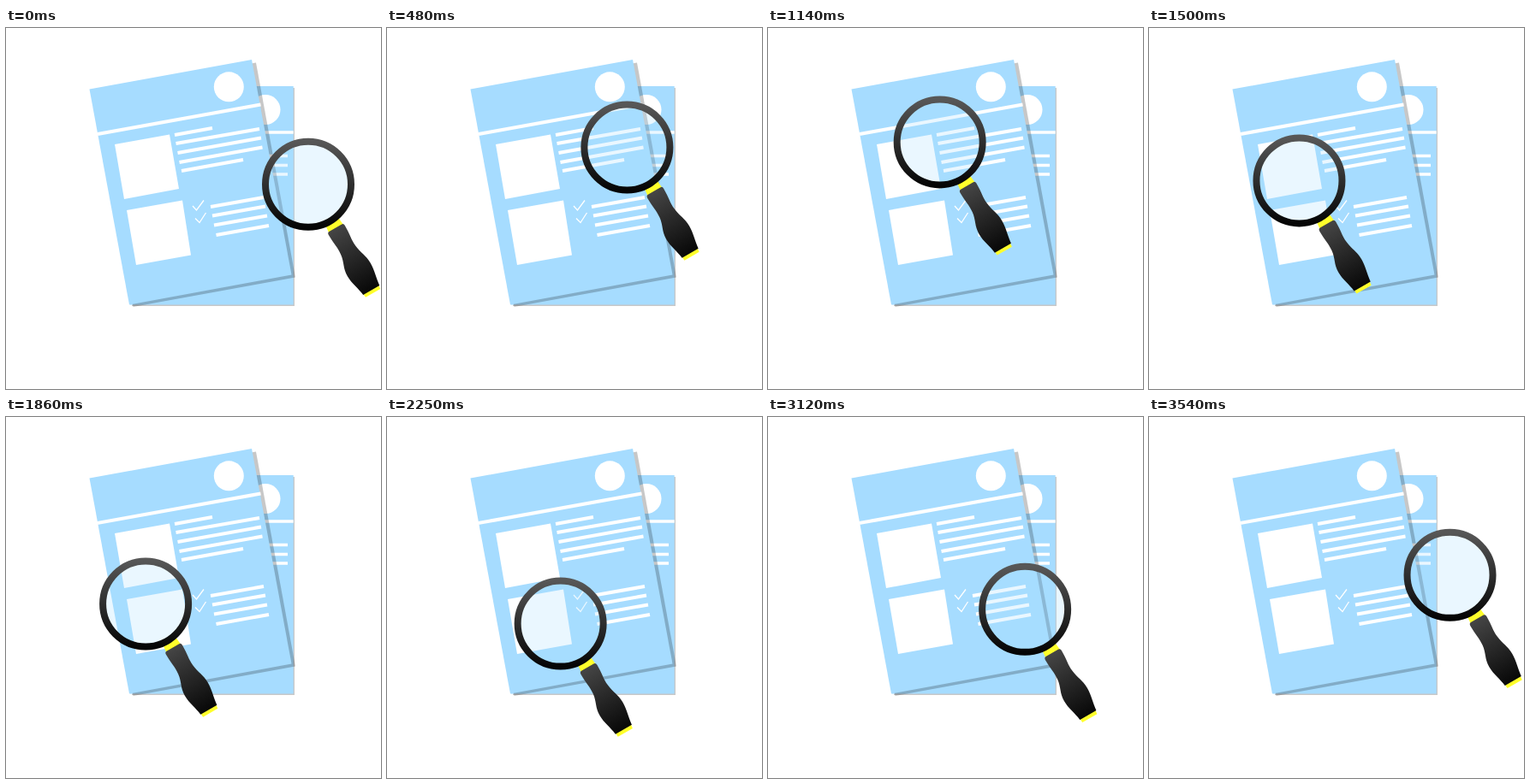
These frames come from a looping animation (438x422 px, 3.57 s). An HTML page:

```html
<!DOCTYPE html>
<html lang="en">
<head>
<meta charset="utf-8">
<title>Document search</title>
<style>
  html, body { margin: 0; width: 100%; height: 100%; overflow: hidden; background: #fff; }
  svg { display: block; width: 438px; height: 422px; }
</style>
</head>
<body>
<svg viewBox="0 0 438 422">
  <defs>
    <linearGradient id="ringShade" x2="0" y2="1">
      <stop stop-color="#575757"/><stop offset="1" stop-color="#050505"/>
    </linearGradient>
    <linearGradient id="gripShade" x2="0" y2="1">
      <stop stop-color="#454545"/><stop offset="1" stop-color="#080808"/>
    </linearGradient>
  </defs>

  <g id="backPage">
    <path d="M147 70H337V325H147Z" fill="#c8c8c8"/>
    <path d="M145 68H335.7V323.6H145Z" fill="#a6dcff"/>
    <circle cx="303" cy="95.5" r="17.5" fill="#fff"/>
    <path d="M200 122H335.7M240 149.5H329M240 160.5H329M240 171H329" stroke="#fff" stroke-width="3.6"/>
  </g>

  <g id="frontPage">
    <path d="M102.5 75L292 40.5 338 291.500 148.500 326Z" fill="#000" opacity=".22"/>
    <path d="M97.500 71.500L287 37 333.500 288.500 144 323.500Z" fill="#a6dcff"/>
    <circle cx="260.300" cy="68.800" r="17.500" fill="#fff"/>
    <path d="M127 136L191 124.500 202 188 138 200ZM141 213L206 201.500 216 265.500 152 277Z" fill="#fff"/>
    <path d="M107 124L297.500 89.500M197 125L241 117M198.500 135L296 118M200.500 146L298 128.500M202.500 157L299.500 139.500M205 167L277 154M239 209L301 198M241 219.500L303 208.500M243 230.500L305 219.500M245.500 242L307 231" stroke="#fff" stroke-width="4"/>
    <path d="M218 208L222.500 213 231 201.500M221 222.500L226 227.500 233.500 216" fill="none" stroke="#fff" stroke-width="1.300"/>
  </g>

  <g id="magnifier">
    <g transform="rotate(-30)">
      <path d="M-6.500 52H11L12 62H-7.500ZM-8.500 142H12.500L11.800 148H-8Z" fill="#ffff2b"/>
      <path d="M-6 60H10.500Q13 60 13 63C13 76 11 80 12 90C13 100 17 105 17 116C17 126 14 134 13 144H-9C-10 134 -14 126 -14 116C-14 105 -9 100 -8 90C-7 80 -9 76 -9 63Q-9 60 -6 60Z" fill="url(#gripShade)"/>
    </g>
    <circle r="47" fill="#a6dcff" opacity=".24"/>
    <circle r="50" fill="none" stroke="url(#ringShade)" stroke-width="8"/>
  </g>
</svg>
<script>
  const LOOP = 3570, STEP = 30;
  const stops = [[353, 182.7], [218, 102.5], [155.5, 214], [246, 267], [355.2, 182]];
  const magnifier = document.getElementById('magnifier');

  function draw(now) {
    const time = Math.floor(now % LOOP / STEP) * STEP;
    const progress = time / LOOP * (stops.length - 1);
    const leg = Math.floor(progress);
    const [x, y] = stops[leg].map((from, axis) => from + (stops[leg + 1][axis] - from) * (progress - leg));
    magnifier.setAttribute('transform', `translate(${x} ${y})`);
  }

  let start;
  function tick(now) {
    start ??= now;
    draw(now - start);
    requestAnimationFrame(tick);
  }
  draw(0);
  requestAnimationFrame(tick);
</script>
</body>
</html>
```
